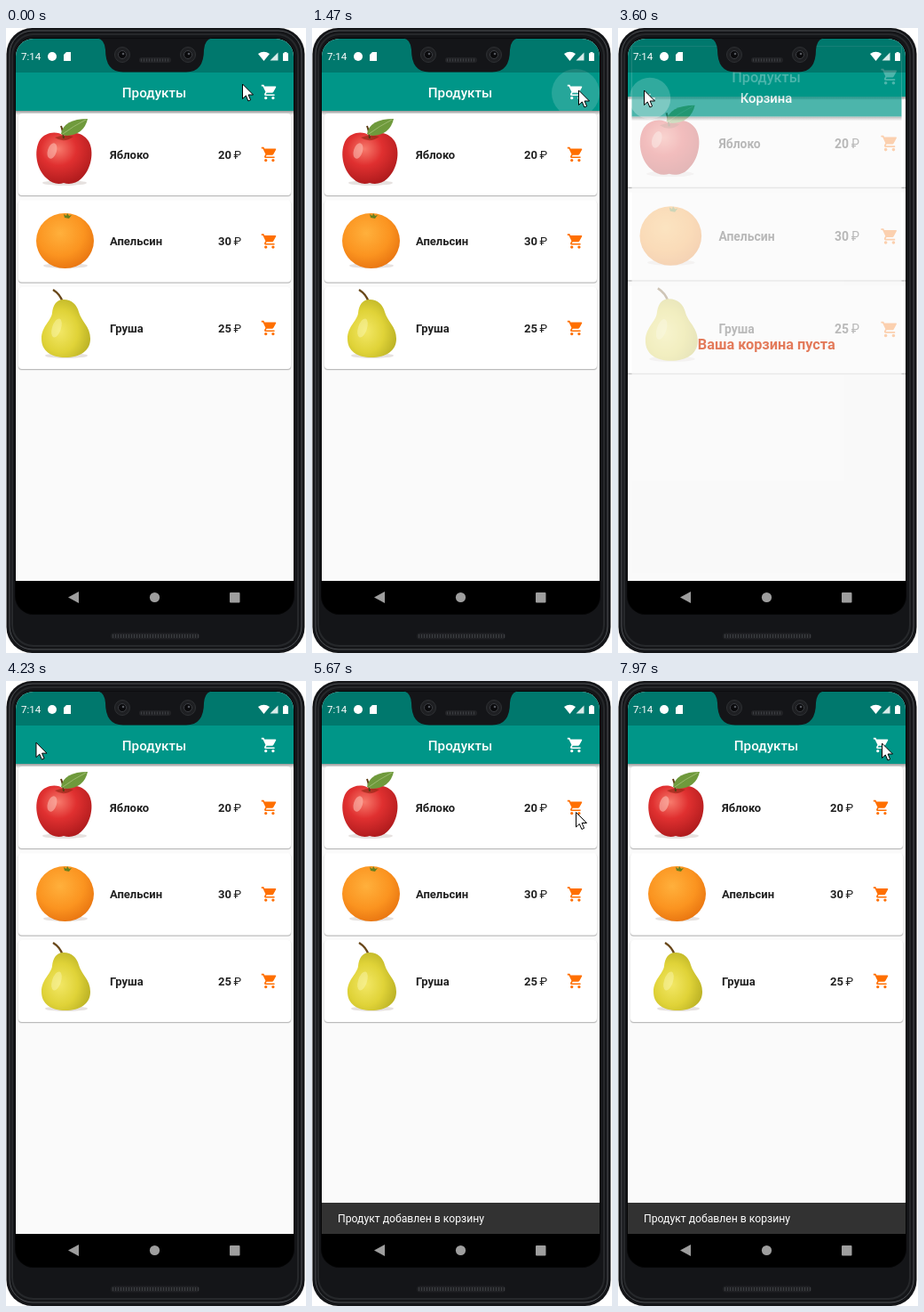
Animation, 338 px wide and 702 px high, one loop 8 s. Source, as an HTML page:

```html
<!DOCTYPE html>
<html lang="ru">
<head>
<meta charset="utf-8">
<title>Продукты</title>
<style>
  html, body { margin: 0; width: 100%; height: 100%; overflow: hidden; background: #fff; }
  svg { display: block; width: 100%; height: 100%; font-family: Roboto, "Noto Sans", sans-serif; }
  .title { font-size: 15.2px; font-weight: 500; fill: #fff; text-anchor: middle; }
  .item { font-size: 13px; font-weight: 700; fill: #212121; }
</style>
</head>
<body>
<svg viewBox="0 0 338 702" xmlns="http://www.w3.org/2000/svg">
  <defs>
    <clipPath id="screen"><rect x="11" y="12" width="313" height="646" rx="20"/></clipPath>
    <clipPath id="content"><rect x="11" y="12" width="313" height="609"/></clipPath>
    <clipPath id="barClip"><rect x="11" y="12" width="313" height="81"/></clipPath>
    <clipPath id="snackClip"><rect id="snackBox" x="11" width="313"/></clipPath>
    <linearGradient id="shade" x2="0" y2="1">
      <stop stop-color="#333" stop-opacity=".5"/>
      <stop offset="1" stop-color="#555" stop-opacity="0"/>
    </linearGradient>
    <radialGradient id="red" cx=".4" cy=".32" r=".72">
      <stop stop-color="#f77a6c"/><stop offset=".45" stop-color="#e03030"/><stop offset="1" stop-color="#ad1a1c"/>
    </radialGradient>
    <radialGradient id="orange" cx=".42" cy=".36" r=".68">
      <stop stop-color="#ffb03c"/><stop offset=".6" stop-color="#fb9420"/><stop offset="1" stop-color="#e87410"/>
    </radialGradient>
    <radialGradient id="pear" cx=".38" cy=".55" r=".66">
      <stop stop-color="#f2e765"/><stop offset=".55" stop-color="#e0d338"/><stop offset="1" stop-color="#b9b024"/>
    </radialGradient>
    <path id="cart" transform="scale(.82) translate(-11 -12)" d="M7 18c-1.1 0-1.99.9-1.99 2S5.9 22 7 22s2-.9 2-2-.9-2-2-2zM1 2v2h2l3.6 7.59-1.35 2.45c-.16.28-.25.61-.25.96 0 1.1.9 2 2 2h12v-2H7.42c-.14 0-.25-.11-.25-.25l.03-.12.9-1.63h7.45c.75 0 1.41-.41 1.75-1.03l3.58-6.49A1 1 0 0 0 20 4H5.21l-.94-2H1zm16 16c-1.1 0-1.99.9-1.99 2s.89 2 1.99 2 2-.9 2-2-.9-2-2-2z"/>
    <g id="page">
      <rect x="11" y="12" width="313" height="609" fill="#fafafa"/>
      <rect x="11" y="93" width="313" height="5" fill="url(#shade)"/>
      <rect x="11" y="12" width="313" height="81" fill="#009688"/>
    </g>
  </defs>

  <rect width="338" height="702" fill="#fff"/>
  <rect x=".5" width="336" height="702" rx="29" fill="#141518"/>
  <rect x="4" y="3" width="329" height="695" rx="26" fill="none" stroke="#505357"/>
  <rect x="7" y="7" width="322" height="687" rx="24" fill="none" stroke="#26282b" stroke-width="2"/>
  <rect x="10" y="11" width="315" height="648" rx="21" fill="#050506"/>

  <g clip-path="url(#screen)">
    <g clip-path="url(#content)">
      <g id="list">
        <use href="#page"/>
        <g id="cards"></g>
        <g id="fruits">
          <ellipse cx="66" cy="174" rx="25" ry="3" fill="#806a60" opacity=".2"/>
          <path d="M65 121c-8-6-21-4-27 5-7 12-4 33 8 43 6 6 13 7 19 5 6 2 14 1 20-5 11-10 15-30 8-42-6-10-20-12-28-6z" fill="url(#red)"/>
          <path d="M55 123q10 7 21-1q-10-3-21 1z" fill="#8d2310" opacity=".6"/>
          <path d="M65 124q-1-9-3-14" fill="none" stroke="#5a3a12" stroke-width="2"/>
          <path d="M62 119q3-17 30-17q-4 18-24 19z" fill="#6f9a3c"/>
          <path d="M64 119q12-9 26-16" fill="none" stroke="#a6c27a" stroke-width=".8"/>
          <ellipse cx="52" cy="138" rx="5" ry="9" fill="#ffd0c4" opacity=".5" transform="rotate(18 52 138)"/>

          <ellipse cx="67" cy="267" rx="25" ry="3" fill="#806a60" opacity=".2"/>
          <ellipse cx="66.5" cy="239" rx="32.5" ry="31" fill="url(#orange)"/>
          <path d="M65 209l3 2 1-3 2 3 3-1-3 4-5-1z" fill="#66801e"/>

          <ellipse cx="68" cy="368" rx="24" ry="3" fill="#806a60" opacity=".2"/>
          <path d="M64 308q-3-9-11-14" fill="none" stroke="#69481a" stroke-width="2.4"/>
          <path d="M65 305c-9 0-12 7-13 15-1 9-12 15-12 29 0 14 11 21 27 21s28-7 28-21c0-14-10-19-13-30-2-8-8-14-17-14z" fill="url(#pear)"/>
          <ellipse cx="57" cy="337" rx="5" ry="11" fill="#fdfac0" opacity=".4" transform="rotate(18 57 337)"/>
        </g>
        <text class="title" x="167" y="77.5">Продукты</text>
        <g clip-path="url(#barClip)"><circle id="openRipple" cx="297" cy="73" fill="#fff"/></g>
        <use href="#cart" x="296" y="72" fill="#fff"/>
        <circle id="addRipple" cx="296" cy="142" fill="#666"/>
        <g clip-path="url(#snackClip)">
          <rect id="snack" x="11" width="313" height="35" fill="#323232"/>
          <text id="snackText" x="29" font-size="12.2" fill="#fff">Продукт добавлен в корзину</text>
        </g>
      </g>
      <rect id="scrim" x="11" y="12" width="313" height="609"/>
      <g id="basket">
        <use href="#page"/>
        <circle id="backRipple" cx="32" cy="72" fill="#fff"/>
        <path transform="translate(32.2 72) scale(.73) translate(-12 -12)" fill="#fff" d="M20 11H7.83l5.59-5.59L12 4l-8 8 8 8 1.41-1.41L7.83 13H20v-2z"/>
        <text class="title" x="167" y="77.5">Корзина</text>
        <text x="167.3" y="362.8" font-size="16.8" font-weight="700" fill="#d84315" text-anchor="middle">Ваша корзина пуста</text>
      </g>
      <rect x="11" y="12" width="313" height="38" opacity=".2"/>
    </g>
    <rect x="11" y="621" width="313" height="37"/>
    <g fill="#9e9e9e">
      <path d="M70 639.5l12-6.5v13z"/>
      <circle cx="167.5" cy="639.5" r="5.6"/>
      <rect x="252" y="634" width="11.5" height="11.5" rx="1"/>
    </g>
    <g fill="#fff">
      <text x="17" y="36" font-size="11.5">7:14</text>
      <circle cx="52" cy="32" r="5"/>
      <path d="M68 27h5v10h-8v-7z"/>
      <path d="M284 29q6.500-4.500 13 0l-6.500 8z"/>
      <path d="M306.500 27.500v9h-9z" opacity=".85"/>
      <path d="M313.500 27h3v1.200h1.500V37h-6v-8.800h1.500z"/>
    </g>
  </g>

  <path d="M103 11.500q8 1 9 13 0 25 20 25h71q20 0 20-25 1-12 9-13z" fill="#141518"/>
  <g id="lenses"></g>
  <rect x="150" y="33" width="36" height="6" rx="3" fill="#222326"/>
  <path d="M152 36h33" stroke="#3c3e42" stroke-width="3" stroke-dasharray="1 2"/>
  <rect x="118" y="679.500" width="100" height="7" rx="3.500" fill="#202124"/>
  <path d="M120 683h97" stroke="#3c3e42" stroke-width="4" stroke-dasharray="1 2"/>

  <path id="cursor" d="M0 0V16.500L3.800 13L6.400 19L9.100 17.800L6.600 12H12Z" fill="#fff" stroke="#000" stroke-linejoin="round"/>
</svg>
<script>
const $ = id => document.getElementById(id);
const set = (id, attrs) => { for (const k in attrs) $(id).setAttribute(k, attrs[k]); };

$('cards').innerHTML = [['Яблоко', 20], ['Апельсин', 30], ['Груша', 25]].map(([name, price], i) => {
  const y = 96 + i * 97.5;
  return `<rect x="13.5" y="${y + .5}" width="308" height="93" rx="4" fill="#666" opacity=".18"/>
    <rect x="14" y="${y + 1}" width="307" height="92" rx="4" fill="#666" opacity=".3"/>
    <rect x="14" y="${y}" width="307" height="92" rx="4" fill="#fff"/>
    <text class="item" x="117" y="${y + 50.7}">${name}</text>
    <text class="item" x="239" y="${y + 50.7}">${price}</text>
    <text x="256.500" y="${y + 50.7}" font-size="13" fill="#212121">₽</text>
    <use href="#cart" x="296" y="${y + 46}" fill="#ff6f00"/>`;
}).join('');

$('lenses').innerHTML = [131, 205].map(x =>
  `<circle cx="${x}" cy="30" r="8.500" fill="#1e1f22" stroke="#2e3033"/>
   <circle cx="${x}" cy="30" r="4.500" fill="#0a0a0c" stroke="#3b3d42"/>
   <circle cx="${x + 1}" cy="29" r="1.300" fill="#55585e"/>`).join('');

const LOOP = 8000, PUSH = 1540, POP = 3565, ZOOM = 300;
const ramp = (t, from, to) => Math.min(1, Math.max(0, (t - from) / (to - from)));
const smooth = u => u * u * u * (10 - 15 * u + 6 * u * u);
const easeOut = u => 1 - (1 - u) ** 3;
const zoomCurve = u => u < .166
  ? .4 * u / .166
  : .4 + .6 * easeOut((u - .166) / .834);

// Pointer stops: place, departure and arrival times
const stops = [
  [266.5, 63, 0, 0],
  [300.5, 70, 200, 1050],
  [29.5, 70, 2400, 3250],
  [33.5, 69, 4080, 4240],
  [297.5, 147.5, 4180, 5050],
  [297.5, 70, 6800, 7700]
];

function pointer(t) {
  let [x, y] = stops[0];
  for (const [px, py, from, to] of stops.slice(1)) {
    const u = smooth(ramp(t, from, to));
    x += (px - x) * u;
    y += (py - y) * u;
  }
  return [x, y];
}

function zoom(id, scale) {
  set(id, { transform: `translate(167.5 316.5) scale(${scale}) translate(-167.5 -316.5)` });
}

function ripple(id, t, down, up, radius, alpha) {
  const grow = easeOut(ramp(t, down, down + 180));
  set(id, {
    r: radius * (.3 + .7 * grow),
    opacity: alpha * ramp(t, down, down + 60) * (1 - ramp(t, up, up + 200))
  });
}

function draw(t) {
  const push = ramp(t, PUSH, PUSH + ZOOM), pop = ramp(t, POP, POP + ZOOM);
  const popping = t >= POP;
  const open = zoomCurve(push), close = zoomCurve(pop);

  zoom('list', popping ? 1.1 - .1 * close : 1 + .05 * open);
  zoom('basket', popping ? 1 - .1 * close : .85 + .15 * open);
  set('basket', { opacity: popping ? 1 - ramp(pop, .0825, .2075) : ramp(push, .125, .25) });
  set('scrim', { opacity: popping ? 0 : .6 * ramp(push, .2075, .4175) });

  ripple('openRipple', t, 1280, PUSH, 27, .15);
  ripple('backRipple', t, 3380, POP + 40, 24, .28);
  ripple('addRipple', t, 5150, 5270, 22, .14);

  const rise = ramp(t, 5270, 5520), top = 621 - 35 * easeOut(rise);
  set('snackBox', { y: top, height: 621 - top });
  set('snack', { y: top });
  set('snackText', { y: top + 22, opacity: ramp(rise, .4, 1) });

  set('cursor', { transform: `translate(${pointer(t)})` });
}

function tick() {
  draw(performance.now() % LOOP);
  requestAnimationFrame(tick);
}
tick();
</script>
</body>
</html>
```
